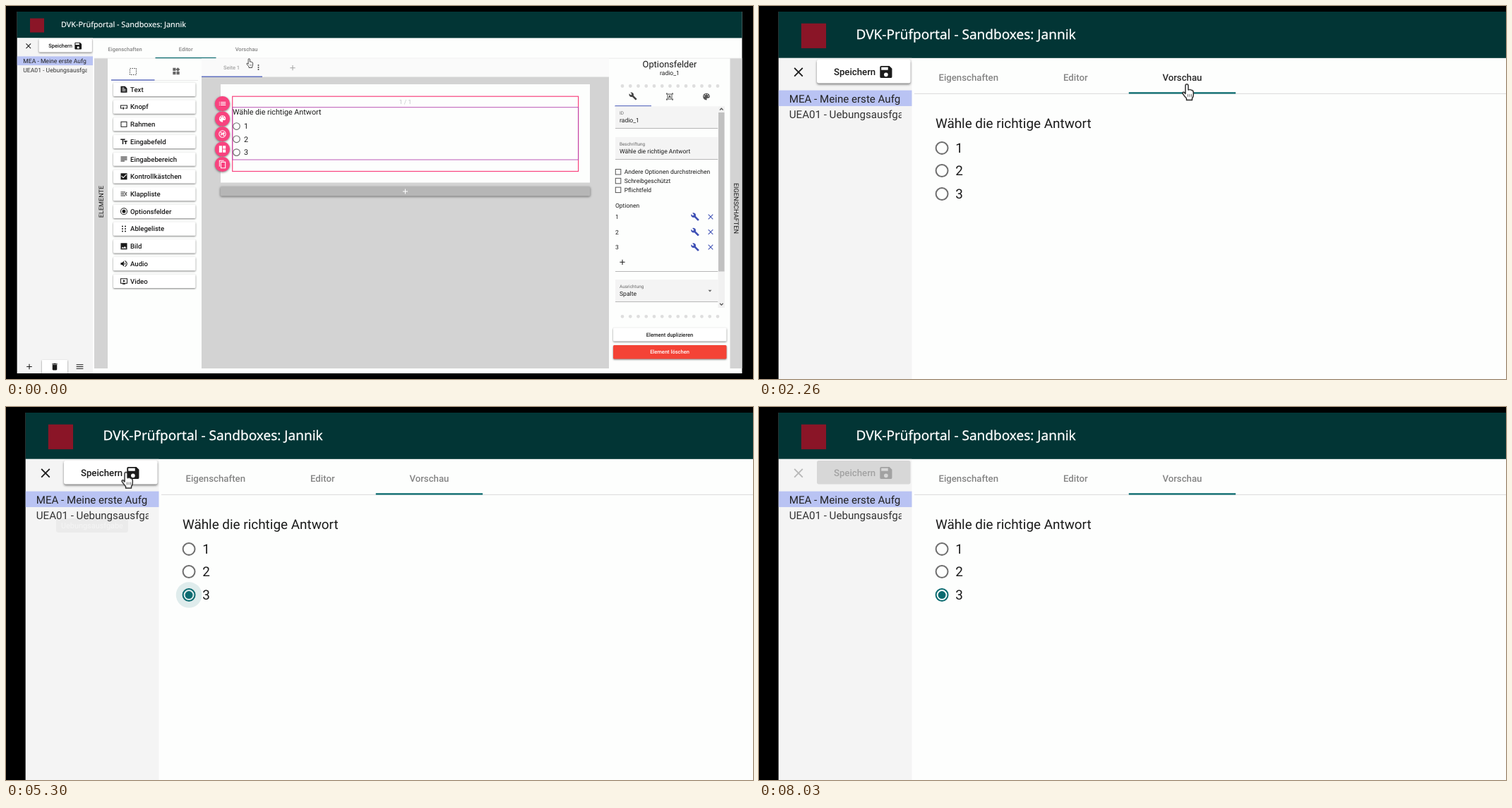
An HTML page for the animation above (8930 ms loop, 1058 px wide and 529 px high).

```html
<!DOCTYPE html>
<html lang="de">
<head>
<meta charset="utf-8">
<title>Vorschau</title>
<style>
html, body { margin: 0; width: 100%; height: 100%; overflow: hidden; background: #000; }
svg { display: block; width: 1058px; height: 529px; }
text { font-family: Roboto, "Liberation Sans", sans-serif; text-rendering: geometricPrecision; white-space: pre; }
.up { filter: drop-shadow(0 1px .8px rgba(0,0,0,.5)); }
.high { filter: drop-shadow(0 1.3px 1.7px rgba(0,0,0,.5)); }
</style>
</head>
<body>
<svg id="stage" viewBox="0 0 1058 529"></svg>
<script>
const LOOP = 8930, ZOOM = 1.76, BLUE = '#3f51b5', TEAL = '#0b6b70', PINK = '#f8437f', INK = '#1b1b1b';

// drawing helpers
const rect = (x, y, x2, y2, fill, more = '') =>
  `<rect x="${x}" y="${y}" width="${x2 - x}" height="${y2 - y}" fill="${fill}" ${more}/>`;
const text = (x, y, s, size, fill = INK, more = '') =>
  `<text x="${x}" y="${y}" font-size="${size}" fill="${fill}" ${more}>${s}</text>`;
const mid = 'text-anchor="middle"', bold = 'font-weight="500"';
const disc = (x, y, r, fill, more = '') => `<circle cx="${x}" cy="${y}" r="${r}" fill="${fill}" ${more}/>`;
const group = (id, body, more = '') => `<g id="${id}" ${more}>${body}</g>`;
const dot = (x, y, r) => `M${x - r} ${y}a${r} ${r} 0 1 0 ${2 * r} 0a${r} ${r} 0 1 0 ${-2 * r} 0z`;
const box = (x, y, w, h) => `M${x} ${y}h${w}v${h}h${-w}z`;
const rows = (x, w, ...ys) => ys.map(y => box(x, y, w, 2)).join('');

// icons on a 24 unit grid
const icons = {
  close: 'M19 6.4 17.6 5 12 10.6 6.4 5 5 6.4 10.6 12 5 17.6 6.4 19 12 13.4 17.6 19 19 17.6 13.4 12z',
  add: 'M19 13h-6v6h-2v-6H5v-2h6V5h2v6h6z',
  save: 'M17 3H5a2 2 0 0 0-2 2v14a2 2 0 0 0 2 2h14a2 2 0 0 0 2-2V7zM15 9H5V5h10z' + dot(12, 16, 3),
  trash: 'M6 19c0 1.1.9 2 2 2h8c1.1 0 2-.9 2-2V7H6zM19 4h-3.5l-1-1h-5l-1 1H5v2h14z',
  menu: rows(3, 18, 6, 11, 16),
  more: dot(12, 6, 2) + dot(12, 12, 2) + dot(12, 18, 2),
  wrench: 'M22.7 19l-9.1-9.1c.9-2.3.4-5-1.5-6.9-2-2-5-2.4-7.4-1.3L9 6 6 9 1.6 4.7C.4 7.1.9 10.1 2.9 12.1c1.9 1.9 4.6 2.4 6.9 1.5l9.1 9.1c.4.4 1 .4 1.4 0l2.3-2.3c.5-.4.5-1.1.1-1.4z',
  palette: 'M12 3a9 9 0 0 0 0 18c.8 0 1.5-.7 1.5-1.5 0-.8-.8-1.2-.8-2 0-.8.7-1.5 1.5-1.5H16a5 5 0 0 0 5-5c0-4.4-4-8-9-8z' +
    dot(6.5, 10.5, 1.5) + dot(9.5, 6.5, 1.5) + dot(14.5, 6.5, 1.5) + dot(17.5, 10.5, 1.5),
  widgets: box(13, 13, 8, 8) + box(3, 13, 8, 8) + box(3, 3, 8, 8) + 'M16.7 1.7 11 7.3l5.7 5.7 5.6-5.7z',
  list: rows(3, 2, 7, 11, 15) + rows(7, 14, 7, 11, 15),
  hidden: dot(12, 12, 10) + dot(12, 12, 8) + 'M5 6.5 6.5 5 19 17.5 17.5 19z' + dot(15, 10, 3) + dot(9, 14, 2),
  layout: box(3, 3, 8, 18) + box(13, 3, 8, 8) + box(13, 13, 8, 8),
  copy: 'M16 1H3v17h2V3h11zM7 5v18h14V5zM9 7h10v14H9z',
  frameText: box(5, 4, 14, 16) + box(7, 6, 10, 12) + box(2, 2, 4, 4) + box(18, 2, 4, 4) + box(2, 18, 4, 4) +
    box(18, 18, 4, 4) + 'M11 8h2l3 8h-2l-.5-1.5h-3L10 16H8z',
  doc: 'M5 3h10l6 6v12H3V3z' + rows(7, 6, 7) + rows(7, 10, 11, 15),
  button: 'M2 7h20v10h-6v-2h4V9H4v6h3v2H2zM10 11l2 4 4 1-4 1-2 4-1-4-3-1 3-1z',
  frame: box(3, 4, 18, 16) + box(5, 6, 14, 12),
  field: 'M2.5 4v3h5v12h3V7h5V4zM21.5 9h-9v3h3v7h3v-7h3z',
  area: rows(3, 18, 5, 9, 13) + rows(3, 11, 17),
  check: 'M3 3h18v18H3zM10 17 20 7l-1.5-1.5L10 14l-4-4-1.5 1.5z',
  drop: rows(3, 13, 6, 16) + rows(3, 10, 11) + 'M21 15.6 17.4 12 21 8.4 19.6 7l-5 5 5 5z',
  radio: dot(12, 12, 10) + dot(12, 12, 8) + dot(12, 12, 5),
  grip: [5, 12, 19].map(y => dot(8, y, 2) + dot(16, y, 2)).join(''),
  image: 'M3 3h18v18H3zM5 18h14l-4.5-6-3.5 4.5L8.500 13.500z',
  audio: 'M3 9v6h4l5 5V4L7 9zM14 8v8c3-1.5 3-6.5 0-8zM14 3v2c7 2 7 12 0 14v2c10-2.5 10-15.5 0-18z',
  video: 'M2 4h20v15H2zM4 6v11h16V6zM10 8l6 3.5-6 3.5zM8 19h8v2H8z'
};
const icon = (name, x, y, size, fill = INK, more = '') =>
  `<path d="${icons[name]}" fill-rule="evenodd" fill="${fill}" ${more}
    transform="translate(${x - size / 2} ${y - size / 2}) scale(${size / 24})"/>`;

function shell() {
  return rect(15.8, 8, 1042.5, 521, '#fdfefd') +
    rect(15.8, 8, 1042.5, 45.4, '#023535') +
    rect(34, 17.5, 54, 37.5, '#8a1527') +
    text(78.1, 30.4, 'DVK-Prüfportal - Sandboxes: Jannik', 10.8, '#fff',
      'stroke="#fff" stroke-width=".15" style="font-family:\'Noto Sans\',\'Open Sans\',sans-serif" ' + bold) +
    rect(15.8, 45.4, 123, 521, '#f4f4f4') +
    icon('close', 31.8, 56.7, 12.6, INK, 'id="close"') +
    rect(46.6, 46.6, 121.9, 65.6, '#fff', 'rx="1.5" class="up" id="saveUp"') +
    rect(46.6, 46.6, 121.9, 65.6, '#d7d7d7', 'rx="1.5" id="saveOff"') +
    rect(46.6, 46.6, 121.9, 65.6, '#000', 'rx="1.5" id="press"') +
    group('saveLabel', text(60.2, 59.1, 'Speichern', 7.52, INK, bold) + icon('save', 102.2, 56.6, 13)) +
    rect(15.8, 71.4, 123, 84.1, '#b9c3f3') +
    `<g clip-path="url(#names)">${text(24.3, 81.1, 'MEA - Meine erste Aufg', 8.59, '#222')}
     ${text(24.3, 93.9, 'UEA01 - Uebungsausfgabe', 8.59, '#333')}</g>` +
    rect(51, 502, 87, 521, '#fff', 'class="up"') +
    icon('add', 33, 511.5, 13) + icon('trash', 69, 511.5, 13) + icon('menu', 104.5, 511.5, 13) +
    rect(125, 73.8, 1042.5, 74.4, '#dcdcdc') +
    text(168.6, 63.6, 'Eigenschaften', 7.52, '#858585', mid + ' ' + bold) +
    text(254.7, 63.6, 'Editor', 7.52, '#858585', mid + ' ' + bold) +
    text(340.6, 63.6, 'Vorschau', 7.52, '#858585', mid + ' ' + bold + ' id="tab"') +
    rect(211.5, 72.9, 297.5, 74.2, TEAL, 'id="ink"');
}

function toolbox() {
  const items = [['doc', 'Text'], ['button', 'Knopf'], ['frame', 'Rahmen'], ['field', 'Eingabefeld'],
    ['area', 'Eingabebereich'], ['check', 'Kontrollkästchen'], ['drop', 'Klappliste'], ['radio', 'Optionsfelder'],
    ['grip', 'Ablegeliste'], ['image', 'Bild'], ['audio', 'Audio'], ['video', 'Video']];
  return rect(125, 74.4, 144, 514, '#d3d3d3') +
    text(0, 0, 'ELEMENTE', 9.1, INK, mid + ' transform="translate(138.3 277.5) rotate(-90)"') +
    rect(175.5, 88.5, 184.5, 97.5, 'none', 'stroke="#444" stroke-width="1.1" stroke-dasharray="1.5 1.5"') +
    icon('widgets', 241, 92.5, 12.5, '#666') +
    rect(149, 105, 272, 105.6, '#ddd') + rect(149, 104.4, 210.5, 105.6, BLUE) +
    items.map(([name, label], i) => {
      const y = 118.2 + i * 24.73;
      return rect(152, y - 9.7, 268.5, y + 9.7, '#fff', 'rx="1.5" class="up"') +
        icon(name, 167, y, 12) + text(176, y + 3.4, label, 9.6, INK, bold);
    }).join('');
}

const radio = (x, y, id = '') =>
  `<g ${id && `id="${id}"`}>${disc(x, y, 10.4, TEAL, 'class="halo" opacity="0"')}
   ${disc(x, y, 4.8, 'none', 'class="rim" stroke="#6f6f6f" stroke-width="1.15"')}
   ${disc(x, y, 3.1, TEAL, 'class="core" opacity="0"')}</g>`;

function canvas() {
  const tools = ['list', 'palette', 'hidden', 'layout', 'copy'];
  return rect(277, 101, 854, 514, '#d3d3d3') +
    rect(277, 74.4, 854, 100.4, '#fafafa') + rect(277, 100.4, 854, 101, '#dcdcdc') +
    text(319.5, 90.1, 'Seite 1', 7.5, '#a5a5a5', mid + ' ' + bold) +
    icon('more', 357.5, 87, 12, '#444') + icon('add', 406, 87.7, 12.5, '#a5a5a5') +
    rect(277, 99.6, 363, 100.8, BLUE) +
    rect(304, 111, 827, 250.5, '#fdfefd') +
    text(565.5, 139.4, '1 / 1', 8.6, '#c3c3c8', mid) +
    rect(320.7, 128.2, 810.6, 234.5, 'none', `stroke="${PINK}" stroke-width="1.2"`) +
    rect(320.7, 143.7, 810.6, 218, 'none', 'stroke="#b545b0" stroke-width=".9"') +
    tools.map((name, i) => disc(306.5, 138.5 + i * 21.5, 10.6, PINK, 'class="high"') +
      icon(name, 306.5, 138.5 + i * 21.5, 12.5, '#fff')).join('') +
    text(321, 154, 'Wähle die richtige Antwort', 10.74) +
    [170.5, 188.8, 207.6].map((y, i) => radio(326.5, y) + text(337, y + 3.8, i + 1, 10.74)).join('') +
    rect(303.5, 256, 827.5, 269.5, '#b6b6b6', 'rx="2" class="high"') + icon('add', 565.5, 263, 12, '#fff');
}

function properties() {
  const dots = y => `<path d="M873 ${y}h136" stroke="#dedede" stroke-width="4.8" stroke-linecap="round" stroke-dasharray="0 11.25"/>`;
  const field = (y, label, value) => rect(863, y, 1008.5, y + 31.5, '#f4f4f4') + rect(863, y + 31, 1008.5, y + 31.6, '#8c8c8c') +
    text(869, y + 12, label, 6.4, '#666') + text(869, y + 22.7, value, 8.59);
  const ticks = ['Andere Optionen durchstreichen', 'Schreibgeschützt', 'Pflichtfeld'];
  return rect(1025.5, 74.4, 1042.5, 514, '#d3d3d3') +
    text(0, 0, 'EIGENSCHAFTEN', 9.2, INK, mid + ' transform="translate(1031.3 287) rotate(90)"') +
    text(940, 87, 'Optionsfelder', 12.8, INK, mid) + text(940, 98, 'radio_1', 8.59, INK, mid) +
    dots(113.5) + dots(440.3) +
    icon('wrench', 888, 128, 12, '#444') + icon('frameText', 940, 128.5, 12, '#555') + icon('palette', 992, 128.5, 13, '#555') +
    rect(862.5, 141.2, 914, 142.4, BLUE) +
    field(142.4, 'ID', 'radio_1') + field(186, 'Beschriftung', 'Wähle die richtige Antwort') +
    ticks.map((s, i) => rect(863.3, 231.5 + i * 12.8, 870.8, 239 + i * 12.8, '#fff', 'stroke="#555" stroke-width="1"') +
      text(875.7, 238.4 + i * 12.8, s, 8.5)).join('') +
    text(863, 286, 'Optionen', 8.5) +
    [1, 2, 3].map((n, i) => text(863, 302 + i * 21.5, n, 8.59) + icon('wrench', 976, 299 + i * 21.5, 12.5, BLUE) +
      icon('close', 998, 299 + i * 21.5, 12.5, BLUE)).join('') +
    icon('add', 873, 363.3, 12.5) + rect(863, 376.2, 1008.5, 376.9, '#999') +
    field(388, 'Ausrichtung', 'Spalte') + `<path d="M994.5 402.8h5l-2.5 2.6z" fill="#666"/>` +
    rect(1008.5, 142.4, 1018, 428, '#f1f1f1') + rect(1009, 151, 1017.5, 376.5, '#c1c1c1') +
    `<path d="M1011 147.5l2.3-2.3 2.3 2.3M1011 421.8l2.3 2.3 2.3-2.3" fill="none" stroke="#555" stroke-width="1.3"/>` +
    rect(860, 456.3, 1020.5, 475.5, '#fff', 'rx="1.5" class="up"') +
    text(940, 468.7, 'Element duplizieren', 7.52, INK, mid + ' ' + bold) +
    rect(860, 481, 1020.5, 500.4, '#f44336', 'rx="1.5" class="up"') +
    text(940, 493.4, 'Element löschen', 7.52, '#fff', mid + ' ' + bold);
}

function preview() {
  return text(142, 101.5, 'Wähle die richtige Antwort', 10.74) +
    [117.9, 136.1, 154.9].map((y, i) => radio(147.2, y, 'opt' + (i + 1)) + text(158.1, y + 3.8, i + 1, 10.74)).join('') +
    rect(125, 493.5, 1042.5, 521, '#708090');
}

const stage = document.getElementById('stage');
stage.innerHTML = `<defs><clipPath id="names"><rect x="15" y="70" width="99.7" height="40"/></clipPath></defs>` +
  rect(0, 0, 1058, 529, '#000') +
  group('world', shell() + group('editor', toolbox() + canvas() + properties()) + group('preview', preview()) +
    group('tip', rect(40.3, 93.2, 98.3, 104.6, '#555', 'rx="2"') + text(69.3, 101.2, 'Uebungsausfgabe', 6.2, '#fff', mid)) +
    group('ring', disc(0, 0, 15, 'none', 'stroke="#f04040" stroke-width="4.6" opacity=".25"') +
      disc(0, 0, 15, 'none', 'stroke="#ea3a3a" stroke-width="2" opacity=".8"')) +
    group('hand', `<path transform="scale(.568)" d="M-2 2q0-2 2-2t2 2v6q3-1 4.5.5 2.5 0 2.8 3v3.5q0 3-1.8 5v2.5h-8v-2.5q-3-3-5.5-7 0-2 1.8-1.7l2.2 2.2z"
      fill="#fff" stroke="#222" stroke-width="1.4" stroke-linejoin="round"/>
      <path transform="scale(.568)" d="M1.4 14v4M4 14v4M6.5 14v4" stroke="#444" stroke-width=".8"/>`)) +
  rect(0, 0, 1058, 8, '#000');

// motion tables: time, then values
const $ = id => document.getElementById(id);
const smooth = u => u * u * (3 - 2 * u);
const cubic = u => u < .5 ? 4 * u ** 3 : 1 - 4 * (1 - u) ** 3;
function at(t, keys, ease = smooth) {
  const i = keys.findIndex(k => k[0] > t);
  if (i < 0) return keys[keys.length - 1].slice(1);
  if (!i) return keys[0].slice(1);
  const a = keys[i - 1], b = keys[i], u = ease((t - a[0]) / (b[0] - a[0]));
  return a.slice(1).map((v, j) => v + (b[j + 1] - v) * u);
}
const num = (t, ...keys) => at(t, keys)[0];
const path = [[20, 344.3, 74.7], [330, 344.3, 66.5], [2440, 344.3, 66.5], [2800, 143.8, 125], [3010, 143.8, 125],
  [3120, 152.8, 134.7], [3710, 152.8, 134.7], [4200, 155.7, 154], [4360, 155.7, 154], [4430, 144.9, 151.2],
  [4760, 144.9, 151.2], [5290, 96.6, 56], [5530, 94.9, 54.9], [6850, 94.9, 54.9], [7260, 227, 90.4],
  [7850, 227, 90.4], [8030, 303, -7]];
const clicks = [[630, 1560], [3110, 3560], [4420, 4780], [5960, 6840]];
const fade = (id, v) => $(id).setAttribute('opacity', v);

function option(n, on, halo, core) {
  const g = $('opt' + n);
  g.querySelector('.halo').setAttribute('opacity', halo * .12);
  g.querySelector('.core').setAttribute('opacity', core);
  g.querySelector('.rim').setAttribute('stroke', on ? TEAL : '#6f6f6f');
}

function draw(t) {
  const s = at(t, [[1904, 1], [2260, ZOOM]], cubic)[0];
  $('world').setAttribute('transform', `translate(0 ${8 - 8 * s}) scale(${s})`);

  const [x, y] = at(t, path);
  $('hand').setAttribute('transform', `translate(${x} ${y})`);
  fade('hand', t < 8030 ? 1 : 0);

  const hit = clicks.find(([a, b]) => t >= a && t < b);
  fade('ring', hit ? num(t, [hit[1] - 110, 1], [hit[1], 0]) : 0);
  if (hit) $('ring').setAttribute('transform', `translate(${x - .4} ${y + .6}) scale(${num(t, [hit[0], .2], [hit[0] + 220, 1])})`);

  fade('editor', t < 960 ? 1 : 0);
  fade('preview', t < 1230 ? 0 : 1);
  $('ink').setAttribute('x', num(t, [840, 211.5], [1200, 297.6]));
  $('tab').setAttribute('fill', t > 840 && t < 3140 ? '#2b2b2b' : '#858585');

  const two = t >= 3180 && t < 4360, three = t >= 4390;
  option(2, two, num(t, [3130, 0], [3330, 1], [3960, 1], [4170, 0]), two ? 1 : 0);
  option(3, three, num(t, [4390, 0], [4580, 1], [5990, 1], [6200, 0]), three ? 1 : num(t, [4110, 0], [4200, .15]));
  fade('tip', num(t, [5200, 0], [5290, .05], [5400, .05], [5520, 0]));

  const off = t >= 6330;
  fade('saveUp', off ? 0 : 1);
  fade('saveOff', off ? 1 : 0);
  fade('press', num(t, [5980, 0], [6250, .1], [6850, .1], [7230, 0]));
  fade('saveLabel', off ? .28 : 1);
  fade('close', off ? .28 : 1);
}

function tick() {
  draw(performance.now() % LOOP);
  requestAnimationFrame(tick);
}
tick();
</script>
</body>
</html>
```
